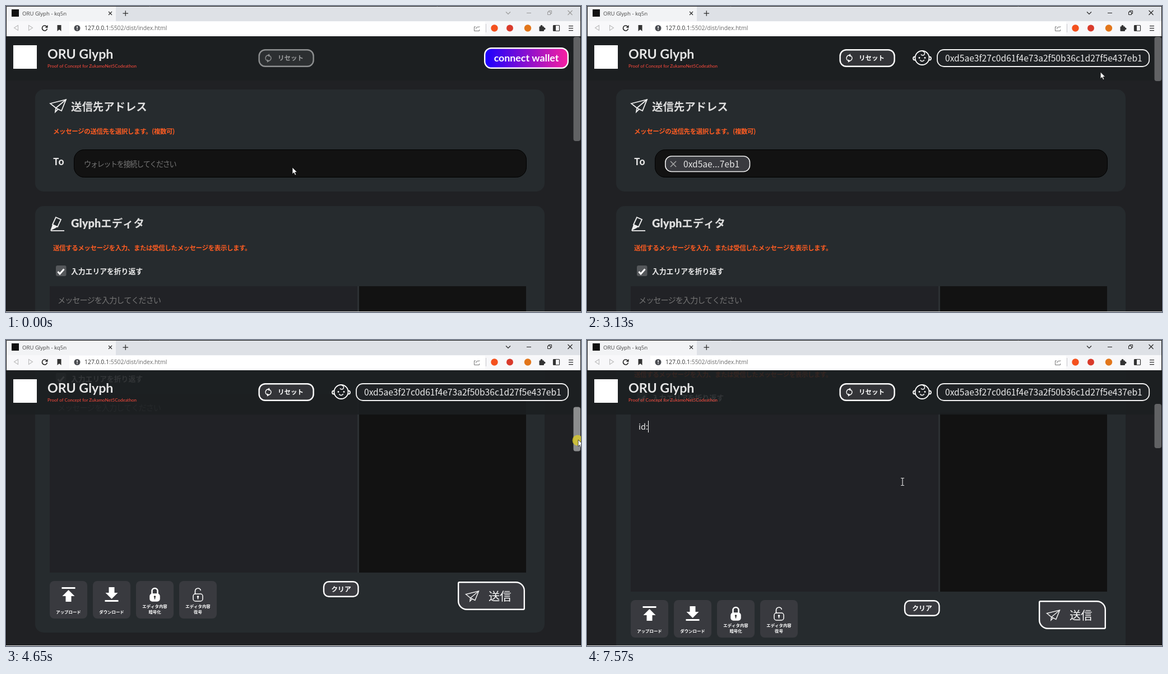
An HTML page with a canvas for the animation above (8000 ms loop, 1026 by 546 pixels).

```html
<!DOCTYPE html>
<html lang="ja">
<head>
<meta charset="utf-8">
<title>ORU Glyph</title>
<style>
html, body { margin: 0; width: 100%; height: 100%; overflow: hidden; background: #202124; }
canvas { display: block; }
</style>
</head>
<body>
<canvas id="stage" width="1026" height="546"></canvas>
<script>
const W = 1026, H = 546, LOOP = 8000, STEP = 70, TOP = 54;
const ctx = document.getElementById('stage').getContext('2d');
const JP = '"Noto Sans CJK JP", "Noto Sans CJK", sans-serif';
const LATO = 'Lato, sans-serif';
const UI = '"Open Sans", "Noto Sans", sans-serif';
const ADDRESS = '0xd5ae3f27c0d61f4e73a2f50b36c1d27f5e437eb1';
const SHORT = ADDRESS.slice(0, 6) + '...' + ADDRESS.slice(-4);
const ORANGE = '#ff5c22', CARD = '#262b2e', PANEL = '#393a3f', WHITE = '#fff', INK = '#333';

const LINKED = 2630, GRAB = 4160, DROP = 5140, FOCUS = 5880;
const TYPED = 'id:', KEYS = [6780, 6910, 7570];
const GRAB_Y = 110, DRAG = 5.94;

// Pointer moves: first step, last step, end point, sag of the path
const START = [511, 288];
const MOVES = [
  [330, 1090, 945, 26, 0],
  [1170, 1590, 966, 104, 60],
  [1660, 1940, 952, 96, 0],
  [2010, 2420, 936, 85, 0],
  [2840, 3330, 907, 133, 0],
  [3530, 3600, 1021, GRAB_Y, 0],
  [4300, 4650, 1021, 178, 0],
  [4930, 5070, 1021, 172.3, 0],
  [5350, 5840, 563, 253, 200]
];

const within = (v, a, b) => v >= a && v < b;
const ease = k => k * k * (3 - 2 * k);

function pointerAt(t) {
  let [x, y] = START;
  for (const [from, to, ex, ey, sag] of MOVES) {
    if (t < from) break;
    const k = Math.min(1, Math.floor((t - from) / STEP + 1) * STEP / (to - from + STEP));
    x += (ex - x) * ease(k);
    y += (ey - y) * ease(k) + sag * Math.sin(Math.PI * k);
  }
  return [x, y];
}

function scrollAt(t) {
  if (t < GRAB) return 0;
  return Math.max(0, (pointerAt(Math.min(t, DROP))[1] - GRAB_Y) * DRAG);
}

function paint(fill, stroke, lw = 1) {
  if (fill) { ctx.fillStyle = fill; ctx.fill(); }
  if (stroke) { ctx.strokeStyle = stroke; ctx.lineWidth = lw; ctx.stroke(); }
}

function rect(x, y, w, h, fill) {
  ctx.fillStyle = fill;
  ctx.fillRect(x, y, w, h);
}

function box(x, y, w, h, r, fill, stroke, lw) {
  ctx.beginPath();
  ctx.roundRect(x, y, w, h, r);
  paint(fill, stroke, lw);
}

function arc(x, y, r, a, b, stroke, lw) {
  ctx.beginPath();
  ctx.arc(x, y, r, a, b);
  paint(null, stroke, lw);
}

function disc(x, y, r, fill, stroke, lw) {
  ctx.beginPath();
  ctx.arc(x, y, r, 0, 7);
  paint(fill, stroke, lw);
}

function poly(points, fill, stroke, lw, open) {
  ctx.beginPath();
  for (let i = 0; i < points.length; i += 2) ctx.lineTo(points[i], points[i + 1]);
  if (!open) ctx.closePath();
  paint(fill, stroke, lw);
}

const line = (points, stroke, lw) => poly(points, null, stroke, lw, true);

function cross(x, y, r, color, lw) {
  line([x - r, y - r, x + r, y + r], color, lw);
  line([x + r, y - r, x - r, y + r], color, lw);
}

// Triangle pointing along dir (1 right, -1 left)
function wedge(x, y, r, dir, fill, stroke) {
  poly([x + r * dir, y, x - r * dir, y - r * 1.3, x - r * dir, y + r * 1.3], fill, stroke, 1.1);
}

function placed(x, y, k, draw) {
  ctx.save();
  ctx.translate(x, y);
  ctx.scale(k, k);
  draw();
  ctx.restore();
}

// cy is the visual middle of the line; returns the advance
function text(s, x, cy, size, color, { weight = 400, font = JP, gap = 0, align = 'left' } = {}) {
  ctx.font = `${weight} ${size}px ${font}`;
  ctx.letterSpacing = gap + 'px';
  ctx.textAlign = align;
  ctx.fillStyle = color;
  ctx.fillText(s, x, cy + size * 0.37);
  return ctx.measureText(s).width;
}

const heading = (s, x, y) => text(s, x, y, 19.4, '#dedede', { weight: 700 });
const note = (s, y) => text(s, 84, y, 11.5, ORANGE, { weight: 700, gap: -0.43 });

function plane(x, y, k) {
  placed(x, y, k, () => {
    poly([-14, -4, 14, -11, 6, 9, -4, 4], null, '#eee', 1.8);
    line([14, -11, -4, 4, -5, 11, 0, 6], '#eee', 1.8);
  });
}

function marker(x, y) {
  placed(x, y, 1, () => {
    poly([-2, -11, 7, -7, 1, 6, -8, 2], null, '#eee', 1.8);
    poly([-8, 2, 1, 6, -4, 9, -12, 13], '#eee');
    line([-11, 13, 13, 13], '#eee', 1.8);
  });
}

function refresh(x, y, color) {
  for (const dir of [1, -1]) {
    const turn = dir > 0 ? 0 : Math.PI;
    arc(x, y, 5, turn - 1.2, turn + 1.5, color, 1.4);
    wedge(x, y - 5 * dir, 2.1, -dir, color);
  }
}

function baby(x, y) {
  for (const s of [-1, 1]) disc(x + 13 * s, y + 1, 3, null, WHITE, 1.8);
  disc(x, y, 12.5, '#1e2124', WHITE, 1.8);
  for (const s of [-1, 1]) disc(x + 5 * s, y, 1.4, WHITE);
  arc(x + 1, y - 8, 3.5, -1.6, 2.6, WHITE, 1.5);
  arc(x, y + 2, 4, 0.4, 2.7, WHITE, 1.5);
}

function padlock(x, y, open) {
  ctx.beginPath();
  ctx.moveTo(x - 5, y);
  ctx.arc(x, y - 6, 5, Math.PI, open ? -0.2 : 0);
  if (!open) ctx.lineTo(x + 5, y);
  paint(null, WHITE, open ? 1.7 : 2.6);
  box(x - 8.5, y - 1, 17, 13, 4, open ? null : WHITE, WHITE, 1.5);
  const hole = open ? WHITE : INK;
  disc(x, y + 4, 1.8, hole);
  rect(x - 0.8, y + 4, 1.6, 4.5, hole);
}

function bigArrow(x, y, dir) {
  placed(x, y, 1, () => {
    ctx.scale(1, dir);
    rect(-12, -13, 24, 3, WHITE);
    poly([0, -8, 11, 3, -11, 3], WHITE);
    rect(-5, 3, 10, 10, WHITE);
  });
}

const TOOLS = [
  [(x, y) => bigArrow(x, y, 1), 'アップロード'],
  [(x, y) => bigArrow(x, y, -1), 'ダウンロード'],
  [(x, y) => padlock(x, y, false), 'エディタ内容', '暗号化'],
  [(x, y) => padlock(x, y, true), 'エディタ内容', '復号']
];

function tools(x, y) {
  TOOLS.forEach(([icon, ...lines], i) => {
    const left = x + i * 77, mid = left + 33.5;
    box(left, y, 67, 67, 8, PANEL);
    icon(mid, y + 24);
    lines.forEach((s, row) =>
      text(s, mid, y + 65 - lines.length * 10 + row * 10, 7.4, WHITE, { weight: 700, align: 'center' }));
  });
}

function recipient(linked) {
  plane(93, 178, 1);
  heading('送信先アドレス', 116, 180);
  note('メッセージの送信先を選択します。(複数可)', 224);
  text('To', 84, 278, 17, '#e4e4e4', { weight: 700 });
  box(121.5, 256.5, 807, 49, 18, '#121212', '#000');
  if (linked) {
    box(139.8, 268, 150.7, 27.5, 11, PANEL, '#eee', 1.6);
    cross(154, 282, 5, '#aaa', 1.4);
    text(SHORT, 172, 282, 15.55, '#e8e8e8');
  } else {
    text('ウォレットを接続してください', 139, 282, 13.2, '#757575', { gap: -1.45 });
  }
}

function editor(t) {
  marker(91, 388);
  const w = text('Glyph', 116, 388, 20, '#dedede', { weight: 900, font: LATO });
  heading('エディタ', 116 + w, 388);
  note('送信するメッセージを入力、または受信したメッセージを表示します。', 432);
  box(89, 463, 18.5, 19, 3, '#55585b');
  line([92.5, 474, 96, 478, 103.5, 469.5], WHITE, 3);
  text('入力エリアを折り返す', 116, 473, 12.8, '#ececec', { weight: 700 });

  rect(78, 500, 549, 319, '#212226');
  rect(627, 500, 3, 319, '#2c3033');
  rect(630, 500, 298, 319, '#121212');
  message(t);

  tools(78, 834);
  box(567, 835.2, 61.5, 26.5, 9, PANEL, WHITE, 2.4);
  text('クリア', 598, 848.5, 11.8, WHITE, { weight: 700, align: 'center' });
  box(807.2, 836.2, 117.6, 48.6, [2, 15, 2, 15], PANEL, WHITE, 2.4);
  plane(832, 861, 0.82);
  text('送信', 861, 861, 20.3, WHITE, { weight: 500 });
}

function message(t) {
  const hits = KEYS.filter(k => t >= k);
  let w = 0;
  if (hits.length) w = text(TYPED.slice(0, hits.length), 92, 525, 14.5, '#f0f0f0');
  else text('メッセージを入力してください', 92, 525, 14.2, '#757575', { gap: -1.05 });
  const idle = t - Math.max(FOCUS, ...hits);
  if (idle >= 0 && Math.floor(idle / 500) % 2 === 0) rect(Math.round(92 + w), 514, 1, 21, WHITE);
}

function page(t, linked) {
  for (const [y, h] of [[149, 182], [357, 569], [952, 200]]) box(52, y, 909, h, 15, CARD);
  recipient(linked);
  editor(t);
}

function header(t, linked) {
  rect(1, TOP, 1024, 133 - TOP, 'rgba(28,31,33,0.89)');
  rect(13, 70, 42, 42, WHITE);
  text('ORU Glyph', 74, 85.5, 23.2, '#e6e6e6', { weight: 700, font: LATO });
  text('Proof of Concept for ZukamoNet5Codeathon', 74, 107.3, 8, '#ff4a3d', { font: LATO });

  const tone = linked ? WHITE : '#8e9091';
  box(451.6, 78.2, 97, 29.6, 11, linked ? '#333438' : '#2c2f31', tone, 2.4);
  refresh(468, 93, tone);
  text('リセット', 485, 93, 11.5, linked ? WHITE : '#9b9d9e', { weight: 700 });

  if (linked) {
    baby(598, 92.5);
    box(625, 78, 378.2, 30, 12, '#1f2225', '#f2f2f2', 1.8);
    text(ADDRESS, 639, 93.5, 15.6, '#ededed');
  } else {
    connectButton(within(t, 2420, LINKED));
  }
}

function connectButton(pressed) {
  ctx.globalAlpha = pressed ? 0.74 : 1;
  const g = ctx.createLinearGradient(854, 0, 1003, 0);
  g.addColorStop(0, '#1a00ff');
  g.addColorStop(1, '#f71fa0');
  box(854.2, 75.2, 148.6, 35.6, 12, g, WHITE, 2.4);
  text('connect wallet', 928.5, 92.5, 17.8, WHITE, { weight: 700, font: LATO, align: 'center' });
  ctx.globalAlpha = 1;
}

function tabStrip(t) {
  rect(0, 0, W, 27, '#dee1e6');
  rect(1, 1, 195, 26, '#f2f3f5');
  rect(10, 6, 13, 13, '#111');
  text('ORU Glyph - kq5n', 29, 13, 9.6, '#444', { font: UI });
  cross(186, 13, 3, INK, 1.2);
  rect(208.5, 12.5, 9.5, 1.3, INK);
  rect(212.6, 8.4, 1.3, 9.5, INK);

  const c = t < STEP ? '#999' : '#222';
  line([892, 10.5, 896, 14.5, 900, 10.5], c, 1.1);
  line([929, 12.5, 937, 12.5], c, 1);
  box(966.5, 10.5, 5, 5, 0, null, c);
  line([968.5, 10, 968.5, 8.5, 973.5, 8.5, 973.5, 13.5, 972, 13.5], c, 1);
  cross(1006.5, 12, 4, c, 1.1);
}

function toolbar() {
  rect(0, 27, W, TOP - 27, '#f8f8fa');
  rect(113, 28, 742, 23, WHITE);
  wedge(18, 39, 3.5, -1, null, '#bbb');
  wedge(44, 39, 3.5, 1, null, '#bbb');
  arc(69, 39.5, 4.5, 0.2, 5.4, '#222', 1.6);
  poly([74.5, 34, 74.5, 39, 69.5, 38.5], '#222');
  poly([91.5, 34, 98.5, 34, 98.5, 45, 95, 42, 91.5, 45], INK);
  disc(127, 39.5, 5.5, '#4b4d52');
  rect(126.3, 36, 1.5, 4.2, WHITE);
  rect(126.3, 41.3, 1.5, 1.5, WHITE);
  const host = text('127.0.0.1', 140, 39.5, 10.4, INK, { font: UI });
  text(':5502/dist/index.html', 140 + host, 39.5, 10.4, '#6b6b6b', { font: UI });

  line([838, 37, 835.5, 37, 835.5, 44.5, 844.5, 44.5, 844.5, 42], '#777', 1);
  line([838.5, 41, 839.5, 38, 845.5, 37], '#777', 1);
  rect(856, 32, 1, 15, '#c9c9cc');
  disc(871.5, 39.5, 6.2, '#f4511e');
  disc(899, 39.5, 6, '#d93a2b');
  disc(931, 39.5, 6.2, '#e2761b');
  box(951.5, 36.5, 8.5, 8.5, 1, INK);
  disc(955.5, 36, 2, INK);
  disc(960.5, 40.5, 2, INK);
  box(976.5, 34.5, 11, 10, 1, null, INK, 1.2);
  rect(976.5, 34.5, 4.5, 10, INK);
  for (let i = 0; i < 3; i++) rect(1004, 35 + i * 4, 8, 1.3, INK);
}

function scrollbar(t, offset, linked) {
  const hot = within(t, 3600, 5350);
  box(1012.5, 55 + offset / 6.27, 12.5, linked ? 79 : 186, 4, hot ? '#8c8d8e' : '#616264');
}

function arrow() {
  poly([0, 0, 0, 16, 3.7, 12.6, 6.4, 18.6, 9, 17.4, 6.4, 11.6, 11.5, 11.5], WHITE, '#111', 1);
}

function hand() {
  const shape = (fill, stroke) => {
    box(-2, 0, 3.6, 12, 1.8, fill, stroke, 1.6);
    box(-2, 6, 9.5, 12, 3, fill, stroke, 1.6);
  };
  shape(null, '#111');
  poly([-2, 13, -5, 8.5, -3.5, 7.5, -1, 10], WHITE, '#111', 0.8);
  shape(WHITE);
}

function beam() {
  rect(-0.6, -6, 1.2, 12, '#ddd');
  for (const y of [-7, 6]) rect(-3, y, 6, 1, '#ddd');
}

function pointer(t, x, y) {
  const pressed = [[2420, LINKED], [GRAB, DROP], [5840, 5980]].some(([a, b]) => within(t, a, b));
  if (pressed) disc(x - 1, y + 1, 9.5, 'rgba(222,204,36,0.77)');
  const overButton = t < LINKED && within(x, 853, 1004) && within(y, 74, 112);
  const overEditor = t > DROP && within(x, 78, 627) && within(y, 133, 450);
  if (overButton) placed(x, y, 1, hand);
  else if (overEditor) placed(x, y, 1, beam);
  else placed(x, y, 0.74, arrow);
}

function draw(t) {
  const linked = t >= LINKED;
  const offset = scrollAt(t);
  rect(0, 0, W, H, '#202124');
  placed(0, -Math.round(offset), 1, () => page(t, linked));
  header(t, linked);
  scrollbar(t, offset, linked);
  tabStrip(t);
  toolbar();
  box(0.5, 0.5, W - 1, H, 0, null, '#111');
  rect(0, H - 1, W, 1, '#e4e4e4');
  pointer(t, ...pointerAt(t));
}

function loop() {
  draw(performance.now() % LOOP);
  requestAnimationFrame(loop);
}
loop();
</script>
</body>
</html>
```
